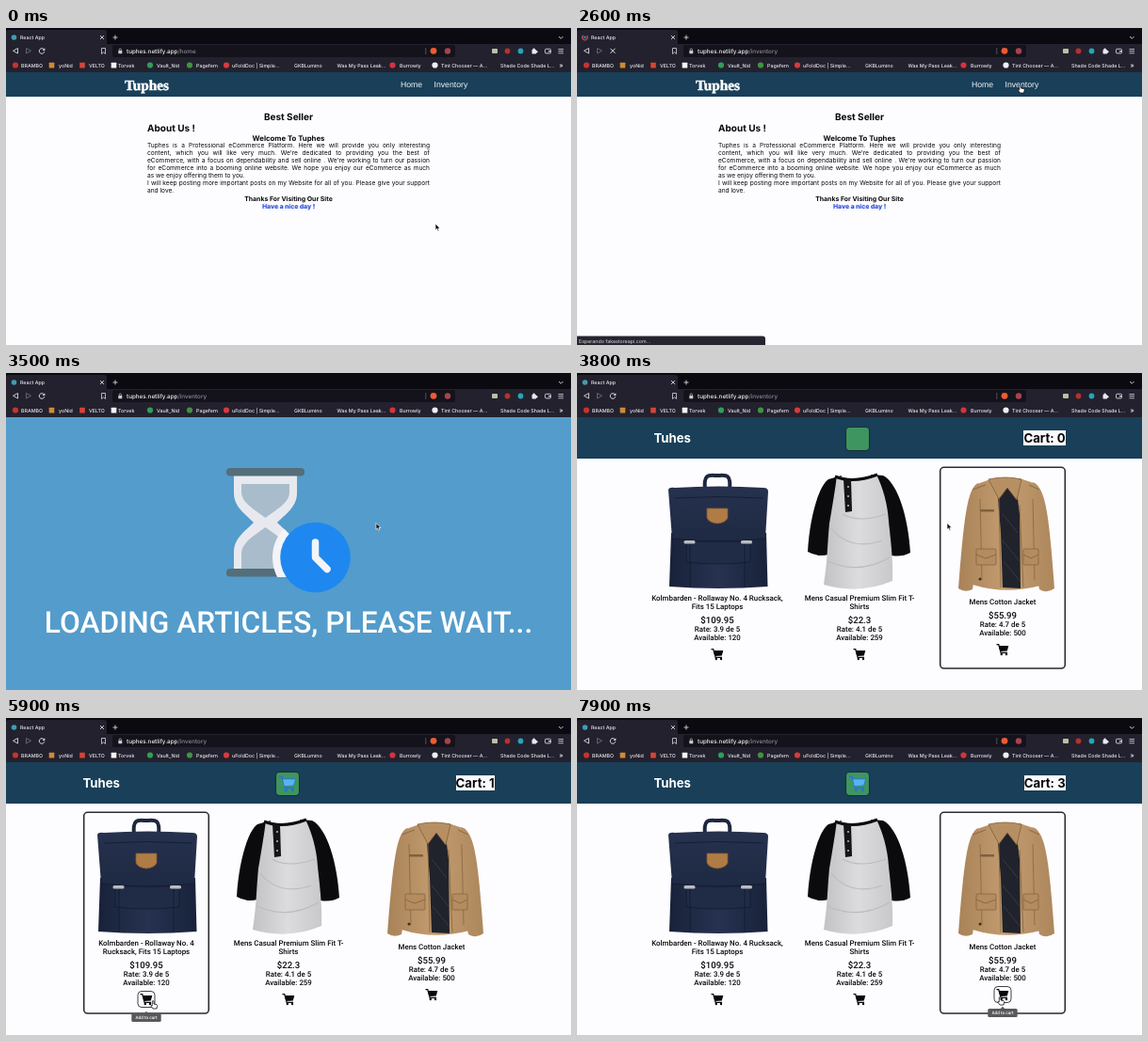
Recreate the animation shown at these times as an HTML page. Size 600 by 337 pixels, loop 8000 ms.

```html
<!DOCTYPE html>
<html lang="en">
<head>
<meta charset="utf-8">
<title>Store demo</title>
<style>
html, body { margin: 0; width: 100%; height: 100%; overflow: hidden; background: #fdfcfe; }
#stage { display: block; width: 600px; height: 337px; }
text { text-rendering: geometricPrecision; white-space: pre; }
.about { font: 6.6px/7.92px Inter, sans-serif; color: #08080a; }
.about div { white-space: nowrap; height: 7.92px; }
.about .full { text-align: justify; text-align-last: justify; word-spacing: -.4px; }
.head { display: flex; justify-content: space-between; align-items: center; height: 44px;
  font: 700 13.2px/16.3px Inter, sans-serif; color: #fff; }
.head svg { width: 26px; height: 26px; margin-top: 1px; }
.head .count { background: #fbfbfd; color: #050507; }
</style>
</head>
<body>
<svg id="stage" viewBox="0 0 600 337"><g id="scene"></g><g id="pointer"></g></svg>
<script>
const W = 600, H = 337, LOOP = 8000;
const NAV = 1600, STATUS = 1700, LOADING = 2700, READY = 3600, ICON = 3900;
const ADDS = [5600, 6700, 7700];
const UI = 'Inter, sans-serif', SANS = 'Liberation Sans, sans-serif', CARD = 'Roboto, sans-serif';
const INK = '#08080a', BAR = '#193f59', PAPER = '#fdfcfe', PALE = '#e9e9ee';

const paint = (fill, line, lw) => `fill="${fill || 'none'}"` + (line ? ` stroke="${line}" stroke-width="${lw}"` : '');
const rect = (x, y, w, h, fill, r = 0, line, lw = 1) =>
  `<rect x="${x}" y="${y}" width="${w}" height="${h}" rx="${r}" ${paint(fill, line, lw)}/>`;
const dot = (x, y, r, fill) => `<circle cx="${x}" cy="${y}" r="${r}" fill="${fill}"/>`;
const shape = (d, fill, line, lw = 1) => `<path d="${d}" ${paint(fill, line, lw)}/>`;
const text = (s, x, y, font, fill = INK, anchor = 'start') =>
  `<text x="${x}" y="${y}" style="font:${font}" fill="${fill}" text-anchor="${anchor}">${s}</text>`;
const at = (x, y, s, body) => `<g transform="translate(${x} ${y}) scale(${s})">${body}</g>`;
const box = (x, y, w, h, body) => `<foreignObject x="${x}" y="${y}" width="${w}" height="${h}">${body}</foreignObject>`;
const gradient = (id, x0, y0, x1, y1, ...stops) =>
  `<linearGradient id="${id}" gradientUnits="userSpaceOnUse" x1="${x0}" y1="${y0}" x2="${x1}" y2="${y1}">` +
  stops.map((s, i) => `<stop offset="${i / (stops.length - 1)}" stop-color="${s}"/>`).join('') + '</linearGradient>';

// ---- browser frame

const bookmarks = [
  ['BRAMBO', 10, 16, '#c8322f'], ['yoNid', 48.5, 56, '#d08a35', 1], ['VELTO', 81, 88, '#d94436', 1],
  ['Torvek', 114.5, 119, '#f4f4f4', 1], ['Vault_Nid', 153, 160, '#2f9e58'], ['Pagefern', 195, 202, '#3f9440'],
  ['uFoldDoc | Simple...', 234, 240, '#d93a3a'], ['GKBLumino', 0, 306], ['Was My Pass Leak...', 0, 351.5],
  ['Burrowly', 410.5, 418, '#d4343c'], ['Tint Chooser — A...', 455.5, 462, '#f0f0f2'],
  ['Shade Code Shade L...', 0, 525]
];

function bookmark([name, ix, x, tone, square]) {
  const icon = !tone ? '' : square ? rect(ix - 2.8, 36.8, 5.6, 5.6, tone, .5) : dot(ix, 39.5, 3.1, tone);
  return icon + text(name, x, 41.5, '500 5.3px ' + UI, PALE);
}

function frameBar(t) {
  const busy = t >= NAV && t < LOADING;
  const spin = Math.floor(t / 100) * 40;
  const page = t < NAV ? '/home' : '/inventory';
  return rect(0, 0, W, 47, '#23212e') + rect(107, 0, W - 107, 17, '#0b0a11') +
    rect(0, 0, 107, 3, '#0b0a11') + rect(0, 2, 107, 16, '#23212e', 3) +
    (busy
      ? `<g transform="rotate(${spin} 8.5 10)">${shape('M11.300 10A2.800 2.800 0 1 1 8.500 7.200', null, '#c4545a', 1.2)}</g>` +
        dot(8.5, 10, 1.4, '#3c7f9c')
      : dot(8.5, 10, 2.8, '#3f9db4')) +
    text('React App', 15, 12, '500 5.3px ' + UI, PALE) +
    shape('M100 8l4 4M104 8l-4 4M113.500 10h5M116 7.500v5M587 9l2.300 2.300L591.600 9', null, '#d5d5da', .9) +
    shape('M12.500 21.500v5.500l-5-2.750z', null, '#d8d8dd', .9) +
    shape('M21.500 21.500v5.500l5-2.750z', null, '#6c6b78', .9) +
    (busy
      ? shape('M35.500 21.800l5 5M40.500 21.800l-5 5', null, '#e4e4e8')
      : shape('M40.300 22.800A2.800 2.800 0 1 0 40.800 25', null, '#e4e4e8', .9) +
        shape('M41.300 21.300v2.600h-2.600z', '#e4e4e8')) +
    shape('M101.500 21.500h4v6l-2-1.700l-2 1.700z', null, '#d8d8dd', .8) +
    rect(113, 18, 364, 13, '#14131b', 2) + rect(119.3, 24, 4, 3.2, '#c9c9cf', .5) +
    shape('M120.200 24v-1a1.100 1.100 0 0 1 2.200 0v1', null, '#c9c9cf', .7) +
    text(`tuphes.netlify.app<tspan fill="#8d8c98">${page}</tspan>`, 128, 26.6, '500 6.3px ' + UI, '#f0f0f3') +
    rect(445.5, 21, .7, 7, '#6c6b78') + dot(454, 24.3, 3.4, '#ee5a32') + dot(469, 24.5, 3.2, '#a8434e') +
    rect(516, 22, 6, 5, '#b9c0a6', 1) + dot(532.5, 24.5, 2.9, '#b5322c') + dot(546.5, 24.5, 2.9, '#25a6b8') +
    rect(558.5, 23, 4.6, 4.4, '#e8e8ec', .7) + dot(560.6, 22.6, 1.2, '#e8e8ec') + dot(563.3, 25.2, 1.2, '#e8e8ec') +
    rect(572.5, 22.3, 6, 4.6, null, 1, '#dcdce0', .9) + rect(576, 24, 2.5, 1.3, '#dcdce0') +
    [0, 1, 2].map(i => rect(586.5, 22 + i * 2.2, 5.5, .8, '#dcdce0')).join('') +
    bookmarks.map(bookmark).join('') +
    text('»', 587.5, 41.5, '600 6.5px ' + UI, PALE);
}

// ---- home page

const about = [
  'Tuphes is a Professional eCommerce Platform. Here we will provide you only interesting',
  "content, which you will like very much. We're dedicated to providing you the best of",
  "eCommerce, with a focus on dependability and sell online . We're working to turn our passion",
  'for eCommerce into a booming online website. We hope you enjoy our eCommerce as much',
  'as we enjoy offering them to you.',
  'I will keep posting more important posts on my Website for all of you. Please give your support',
  'and love.'
];

function home(t) {
  const bold = (s, x, y, size, anchor = 'middle', fill = INK) => text(s, x, y, `700 ${size}px ${UI}`, fill, anchor);
  const lines = about.map(s => `<div class="${s.length > 50 ? 'full' : ''}">${s}</div>`).join('');
  return rect(0, 47, W, 26, BAR) +
    `<g stroke="#fff" stroke-width=".5">${text('Tuphes', 126, 66, '700 15.3px Liberation Serif, serif', '#fff')}</g>` +
    text('Home', 419, 62.8, '8.7px ' + SANS, '#f2f5f7') +
    text('Inventory', 454.5, 62.8, '8.7px ' + SANS, '#f2f5f7') +
    bold('Best Seller', 300, 98, 10) +
    bold('About Us !', 150, 110, 10, 'start') +
    bold('Welcome To Tuphes', 300, 120.3, 7.8) +
    box(150, 122.2, 300, 60, `<div class="about">${lines}</div>`) +
    bold('Thanks For Visiting Our Site', 300, 184, 6.9) +
    bold('Have a nice day !', 300.6, 192.4, 6.8, 'middle', '#a9b4ee') +
    bold('Have a nice day !', 300, 191.9, 6.8, 'middle', '#2f4fe0') +
    (t < STATUS ? '' : rect(-3, 327.5, 203, 13, '#26252f', 3) +
      text('Esperando fakestoreapi.com...', 2, 334.6, '5.3px ' + UI, '#dddde2'));
}

// ---- waiting page

const glass = 'M242 107H309V128C309 142 297 150 288 159C297 168 309 176 309 190V210H242V190C242 176 254 168 263 159C254 150 242 142 242 128Z';

function waiting() {
  return rect(0, 47, W, H - 47, '#539ccc') + shape(glass, '#e7e9ef') +
    shape('M250 118H301V127C301 138 286 146 275.500 154C265 146 250 138 250 127Z', '#a9bccb') +
    shape('M275.500 164C286 172 301 180 301 192V208H250V192C250 180 265 172 275.500 164Z', '#a9bccb') +
    rect(234, 101, 83, 8.5, '#546e7a', 4) + rect(234, 208, 83, 8.5, '#546e7a', 4) +
    `<clipPath id="rim"><path d="${glass}"/><rect x="242" y="207" width="76" height="10"/></clipPath>` +
    `<g clip-path="url(#rim)">${dot(328, 196, 45, '#f3f4f8')}</g>` +
    rect(309, 207, 12, 11, '#539ccc') + dot(328.5, 196, 37.3, '#1e88f0') +
    `<g stroke-linecap="round" stroke-linejoin="round">${shape('M328.500 180V196L341 208.500', null, '#f3f4f8', 7.5)}</g>` +
    text('LOADING ARTICLES, PLEASE WAIT...', 300, 275.5, '500 31.7px ' + CARD, '#fff', 'middle');
}

// ---- inventory page

const cart = (x, y, s, tone) => at(x, y, s,
  shape('M-6.500 -5.300H-4.200L-1.900 3.300H5', null, tone, 1.2) +
  shape('M-4.300 -4H6.300L4.800 1.500L-2.600 2.100Z', tone) +
  dot(-1.2, 5, 1.2, tone) + dot(4, 5, 1.2, tone));

const bag = gradient('denim', 98, 0, 203, 0, '#18223a', '#263250', '#18223a') +
  gradient('flap', 0, 120, 0, 180, '#26324e', '#1e2943') +
  shape('M136 124C134 106 141 109 149 109S164 106 162 124', null, '#1d2740', 4) +
  shape('M100 170H201L202.500 227Q150 231 98 227Z', 'url(#denim)') +
  shape('M97 124Q98 121 104 122Q150 119 198 122Q203 122 203 126L200 176Q150 182 101 176Z', 'url(#flap)') +
  shape('M116 179H184V201Q150 205 116 201Z', '#202b46', '#121a2d', .8) +
  shape('M101 176Q150 182 200 176M120 179V228M178 179V228M104 133Q150 130 198 133', null, '#141c30', .9) +
  rect(113.5, 178, 12, 3.5, '#b9bcc2', 1.5) + rect(174, 178, 12, 3.5, '#b9bcc2', 1.5) +
  shape('M138 144H160V154Q158 159 149 160Q140 159 138 154Z', '#b07c46', '#8a5c30', .8);

const shirt = gradient('knit', 262, 0, 336, 0, '#c2c2c5', '#dcdcde', '#c8c8cb') +
  shape('M267 113C256 121 247 155 245 190Q256 196 267 193L273 150L281 109Z', '#0b0b0d') +
  shape('M325 109C341 117 352 155 354 191Q345 196 334 194L326 150L312 108Z', '#0b0b0d') +
  shape('M276 109Q293 116 318 108C325 122 330 140 331 158C334 185 336 205 335 221Q300 236 262 225C266 200 266 180 268 160C271 142 274 125 276 109Z', 'url(#knit)') +
  shape('M270 165Q290 190 324 178M266 200Q300 215 332 196M282 150Q300 160 328 150', null, '#bcbcc0', 1.2) +
  shape('M274 110Q293 118 319 108', null, '#0b0b0d', 3) +
  shape('M283 113L291 113L292 147L285 148Z', '#151518') +
  [121, 131, 141].map(y => dot(288, y, .9, '#d0d0d0')).join('');

const SEAM = '#80603c';
const jacket = gradient('cloth', 405, 0, 507, 0, '#a98358', '#c39c70', '#ad875c') +
  shape('M426 117C415 122 411 150 405 229Q412 234 420 230L430 170Z', 'url(#cloth)') +
  shape('M484 116C498 122 501 150 507 229Q499 235 491 230L478 170Z', 'url(#cloth)') +
  shape('M439 113L425 118L423 170L420 225Q455 236 492 226L487 170L488 118L470 112Z', 'url(#cloth)') +
  shape('M446 120L466 118L470 150L471 229L452 228L450 170Z', '#20232b') +
  shape('M452 150L468 170M452 178L470 200M453 200L471 222', null, '#3a3f4c', .8) +
  shape('M437 113Q455 109 472 113L467 135L457 122L448 134Z', '#b78f63', SEAM, .8) +
  shape('M448 134L450 228M470 140L474 228M428 134L430 220M484 134L486 220', null, '#87663f', .8) +
  rect(428, 145, 15, 2.5, SEAM, .5) +
  rect(424, 187, 21, 17, '#b48c60', 1, SEAM, .7) + rect(474, 187, 16, 17, '#b48c60', 1, SEAM, .7) +
  shape('M424 193L434 197L445 193M474 193L482 197L490 193M420 124L434 119M480 119L491 124', null, SEAM, .8) +
  dot(428, 219, 1.5, '#3b2f22');

const items = [
  { x: 149, y: 239, iy: 299, art: bag, price: '$109.95', rate: '3.9', left: 120,
    name: ['Kolmbarden - Rollaway No. 4 Rucksack,', 'Fits 15 Laptops'],
    tight: ['Kolmbarden - Rollaway No. 4', 'Rucksack, Fits 15 Laptops'] },
  { x: 300, y: 239, iy: 299, art: shirt, price: '$22.3', rate: '4.1', left: 259,
    name: ['Mens Casual Premium Slim Fit T-', 'Shirts'] },
  { x: 452, y: 243, iy: 294, art: jacket, price: '$55.99', rate: '4.7', left: 500,
    name: ['Mens Cotton Jacket'] }
];

const overCard = (item, m) => Math.abs(m.x - item.x) < 67 && m.y > 100 && m.y < 314;
const overIcon = (item, m) => Math.abs(m.x - item.x) < 9.5 && Math.abs(m.y - item.iy) < 9;

function card(item, m) {
  const { x, y, iy } = item, hot = overCard(item, m);
  const name = hot && item.tight || item.name;
  const line = (s, base, size = 7.9) => text(s, x, base, `500 ${size}px ${CARD}`, INK, 'middle');
  const tip = !overIcon(item, m) ? '' :
    rect(x - 9, iy - 8.5, 18, 17, null, 4, '#2b2b30', .9) +
    shape(`M${x - 2.5} ${iy + 15.2}l2.500 -2.500l2.500 2.500z`, '#58585c') +
    rect(x - 15.7, iy + 15, 31.4, 9, '#58585c', 1.5) +
    text('Add to cart', x, iy + 21.2, '500 4.7px ' + CARD, '#f4f4f4', 'middle');
  return (hot ? rect(x - 66.3, 100.3, 132.6, 213.7, null, 4, '#2b2b30', 1.6) : '') + item.art +
    name.map((s, i) => line(s, y + 2.7 + i * 9)).join('') +
    line(item.price, iy - 33.3, 9.6) +
    line(`Rate: ${item.rate} de 5`, iy - 24.2) +
    line(`Available: ${item.left}`, iy - 14.6) +
    cart(x, iy, 1, INK) + tip;
}

function inventory(t, m) {
  const count = ADDS.filter(a => t >= a).length;
  const icon = rect(.5, .5, 25, 25, '#3f9560', 4, '#17302f', 1.1) +
    (t < ICON ? '' : cart(13, 12.8, 1.4, '#2d74c9') + shape('M8 8.200h13l-1.800 6.300l-9.500 .8z', '#55b4f5'));
  return rect(0, 47, W, 44, BAR) +
    box(81.5, 47, 437.2, 44, `<div class="head"><span>Tuhes</span><svg viewBox="0 0 26 26">${icon}</svg>` +
      `<span class="count">Cart: ${count}</span></div>`) +
    items.map(item => card(item, m)).join('');
}

// ---- pointer

const path = [
  [0, 456, 208], [700, 456, 208], [1500, 470.5, 61], [2750, 470.5, 61], [3400, 393, 159.5],
  [4150, 393, 159.5], [4600, 250, 180], [5250, 156, 301], [6000, 156, 301],
  [6450, 305, 301], [6950, 305, 301], [7450, 449, 297], [LOOP, 449, 297]
];

function place(t) {
  const i = path.findIndex(p => p[0] > t);
  const [t0, x0, y0] = path[i - 1], [t1, x1, y1] = path[i];
  const u = (t - t0) / (t1 - t0), k = u * u * (3 - 2 * u);
  return { x: x0 + (x1 - x0) * k, y: y0 + (y1 - y0) * k };
}

function pointer(t, m) {
  const onLink = t < LOADING && m.x > 454 && m.x < 491 && m.y < 66;
  const hand = onLink || t >= READY && items.some(i => overIcon(i, m));
  return at(m.x, m.y, 1, hand
    ? shape('M-.7 0Q.2 -.8 1 0V3L4 3.600Q5 4 4.600 5.500L4 8H0L-2.200 5Q-2 4 -.7 4.800Z', '#fff', '#111', .8)
    : shape('M0 0V6.800L1.600 5.400L2.700 7.900L3.900 7.400L2.800 5H5Z', '#050505', '#fff', .7));
}

const sceneEl = document.getElementById('scene'), pointerEl = document.getElementById('pointer');
let shown = '';

function frame(now) {
  const t = now % LOOP, m = place(t);
  const page = t < LOADING ? home(t) : t < READY ? waiting() : inventory(t, m);
  const scene = rect(0, 0, W, H, PAPER) + page + frameBar(t);
  if (scene !== shown) sceneEl.innerHTML = shown = scene;
  pointerEl.innerHTML = pointer(t, m);
  requestAnimationFrame(frame);
}
requestAnimationFrame(frame);
</script>
</body>
</html>
```
